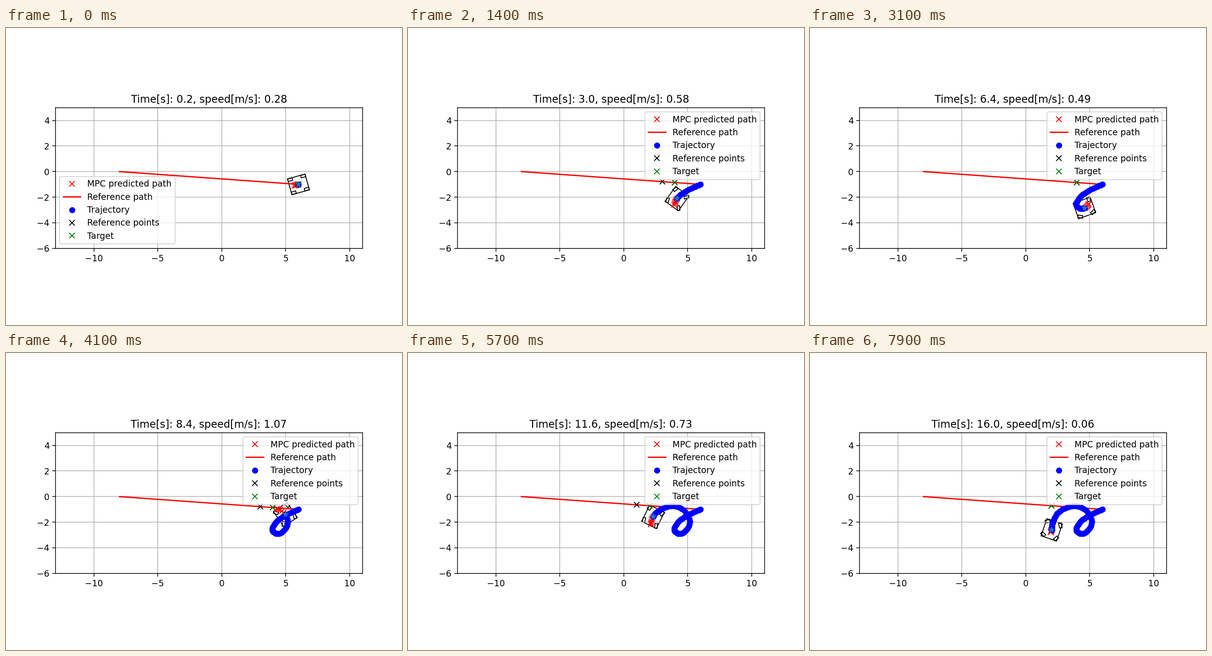
Recreate the animation shown at these times as a matplotlib script. Size 864x648 px, loop 8 s.

```python
import numpy as np
import matplotlib.pyplot as plt
from matplotlib.animation import FuncAnimation
from matplotlib.patches import Polygon

FRAMES, DT = 80, 0.2
LENGTH, WIDTH = 1.42, 1.28
WHEEL_L, WHEEL_W, AXLE = 0.36, 0.2, 0.53

# (t, x, y) way points; heading and speed along them follow the rules below
WAY = np.array([
    (0.2, 6, -1), (1.8, 4.92, -1.495), (4.4, 3.94, -2.62),
    (5.9, 4.35, -2.91), (7.75, 5.16, -2), (9.7, 3.8, -0.74),
    (11.6, 2.29, -1.58), (14, 2.03, -2.45), (16, 2.035, -2.6),
])


def heading(t):
    """Steady left turn with a slow sine; returns yaw and turn rate."""
    tau, k = t - 7, 0.33
    return (7.18 + 0.355 * tau + 0.57 / k * np.sin(k * tau),
            0.355 + 0.57 * np.cos(k * tau))


def pace(t):
    """Speed, cosine-eased between its turning points."""
    tk = np.array([0.2, 1.6, 4.4, 9.57, 14, 16])
    vk = np.array([0.28, 1.02, 0.14, 1.199, 0.12, 0.06])
    pos = np.interp(t, tk, np.arange(len(tk)))
    i = np.minimum(pos.astype(int), len(tk) - 2)
    ease = (1 - np.cos(np.pi * (pos - i))) / 2
    return vk[i] + (vk[i + 1] - vk[i]) * ease


def position(t):
    """Hermite curve through the way points."""
    tk, p = WAY[:, 0], WAY[:, 1:]
    yaw = heading(tk)[0]
    m = pace(tk)[:, None] * np.column_stack([np.cos(yaw), np.sin(yaw)])
    i = np.clip(np.searchsorted(tk, t, side="right") - 1, 0, len(tk) - 2)
    h = (tk[i + 1] - tk[i])[:, None]
    s = (t - tk[i])[:, None] / h
    mix = s * s * (3 - 2 * s)
    return (p[i] + (p[i + 1] - p[i]) * mix
            + h * s * (1 - s) * ((1 - s) * m[i] - s * m[i + 1]))


times = DT * np.arange(1, FRAMES + 1)
track = position(times)
yaws, turns = heading(times)
speed = pace(times)

# reference points lie one unit apart along the line from (6, -1) to (-8, 0)
course = np.array([6, -1]) + np.arange(15)[:, None] * np.array([-14, 1]) / np.hypot(14, 1)
nearest = np.maximum.accumulate(
    np.abs(track[:, :1] - course[:, 0]).argmin(axis=1))


def box(length, width, center, angle):
    c, s = np.cos(angle), np.sin(angle)
    pts = np.array([[1, 1], [1, -1], [-1, -1], [-1, 1]]) * [length / 2, width / 2]
    return pts @ np.array([[c, s], [-s, c]]) + center


def predict(x, y, yaw, v, w):
    """Short look-ahead drifting towards cruising speed."""
    tau = (np.arange(5) + 0.5) * DT
    step = (v + 0.8 * (0.45 - v) * tau) * DT
    ang = yaw + w * tau
    dx, dy = step * np.cos(ang), step * np.sin(ang)
    return x + np.r_[0, dx.cumsum()], y + np.r_[0, dy.cumsum()]


fig, ax = plt.subplots(figsize=(6.4, 4.8), dpi=135)
ax.set_aspect("equal")
ax.set(xlim=(-13, 11), ylim=(-6, 5),
       xticks=range(-10, 11, 5), yticks=range(-6, 5, 2))
ax.grid(True)

predicted, = ax.plot([], [], "xr", label="MPC predicted path")
ax.plot([6, -8], [-1, 0], "-r", label="Reference path")
trail, = ax.plot([], [], "ob", label="Trajectory")
ref_pts, = ax.plot([], [], "xk", label="Reference points")
goal, = ax.plot([], [], "xg", label="Target")
star, = ax.plot([], [], "*", color="C0")
body, *wheels = [ax.add_patch(Polygon(np.zeros((4, 2)), fill=False, ec="k", lw=1))
                 for _ in range(5)]
legend = ax.legend(loc="lower left")
title = ax.set_title("")


def draw_car(x, y, yaw, v, w):
    """Each wheel points along its own velocity."""
    body.set_xy(box(LENGTH, WIDTH, (x, y), yaw))
    c, s = np.cos(yaw), np.sin(yaw)
    corners = [(i * AXLE, j * AXLE) for i in (1, -1) for j in (1, -1)]
    for wheel, (px, py) in zip(wheels, corners):
        steer = np.arctan2(w * px, v - w * py)
        center = (x + c * px - s * py, y + s * px + c * py)
        wheel.set_xy(box(WHEEL_L, WHEEL_W, center, yaw + steer))


def update(n):
    (x, y), yaw, v, w = track[n], yaws[n], speed[n], turns[n]
    draw_car(x, y, yaw, v, w)
    predicted.set_data(*predict(x, y, yaw, v, w))
    trail.set_data(*track[:n + 1].T)
    k = nearest[n]
    ref_pts.set_data(*course[[k, k + round(v)]].T)
    goal.set_data(*course[[k]].T)
    star.set_data([x], [y])
    # the legend steps aside while the car is near the upper right
    legend.set_loc("lower left" if n < 9 or 42 <= n < 56 else "upper right")
    title.set_text(f"Time[s]: {times[n]:.1f}, speed[m/s]: {v:.2f}")
    return []


anim = FuncAnimation(fig, update, frames=FRAMES, interval=100,
                     repeat=True, repeat_delay=0, blit=False)
plt.show()
```
